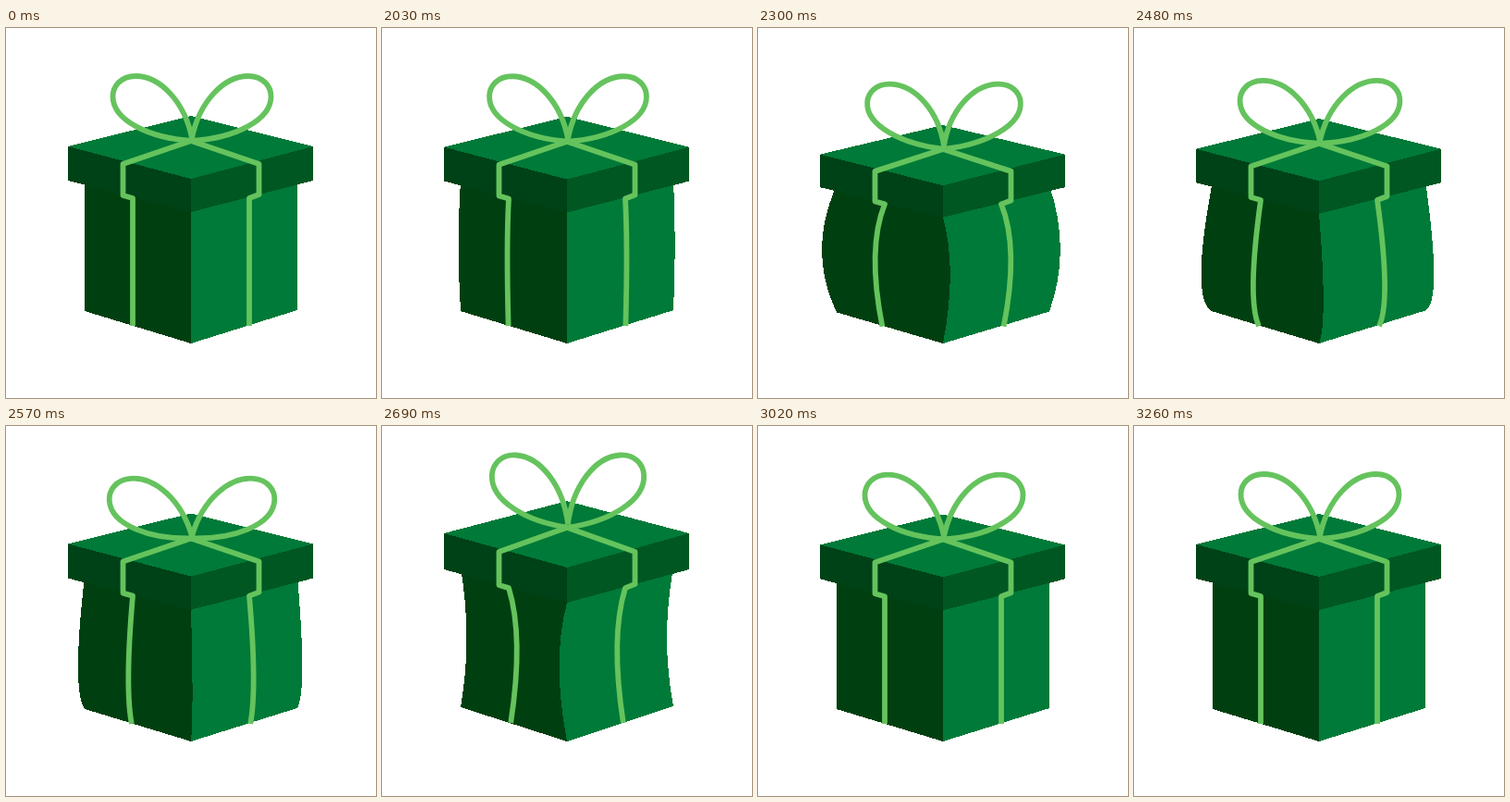
Animation, 400 px wide and 400 px high, one loop 3.35 s. Source, as an HTML page:

```html
<!DOCTYPE html>
<html lang="en">
<head>
<meta charset="utf-8">
<title>Gift box</title>
<style>
  html, body { margin: 0; width: 100%; height: 100%; overflow: hidden; background: #fff; }
  svg { display: block; width: 100%; height: 100%; }
  .ribbon { fill: none; stroke: #65c35d; stroke-width: 5.8; stroke-linejoin: round; }
</style>
</head>
<body>
<svg viewBox="0 0 400 400">
  <g shape-rendering="crispEdges">
    <path id="boxLeft" fill="#004010"/>
    <path id="boxRight" fill="#007a38"/>
    <path id="lidLeft" fill="#004217"/>
    <path id="lidRight" fill="#005722"/>
    <path id="lidTop" fill="#007a38"/>
  </g>
  <path id="ribbon" class="ribbon"/>
  <path id="bow" class="ribbon"/>
</svg>
<script>
const LOOP = 3350, START = 2030, STEP = 30, FLOOR = 341;

// Half a sine wave, zero outside its span
function hump(t, start, length, power = 1) {
  const x = (t - start) / length;
  return x > 0 && x < 1 ? Math.sin(Math.PI * x) ** power : 0;
}

// Crouch, spring up, settle; the box walls and the bow trail behind the lid
function poseAt(t) {
  const swell = hump(t, 2000, 667), pinch = hump(t, 2570, 320);
  return {
    squash: .041 * hump(t, 2000, 560, 1.4) - .059 * hump(t, 2560, 310, 1.4)
      + .004 * hump(t, 2870, 180) - .003 * hump(t, 3050, 180),
    left: 16 * swell - 7 * pinch,
    right: 12 * swell - 7.5 * pinch,
    front: 8 * swell ** 2 - 9 * pinch,
    band: 10.5 * swell - 9.5 * pinch,
    sag: 60 * hump(t, 2300, 390),
    lift: .06 * hump(t, 2000, 470) - .1 * hump(t, 2470, 150) + .085 * hump(t, 2610, 270)
  };
}

const set = (id, d) => document.getElementById(id).setAttribute('d', d);

function draw(t) {
  const { squash, left, right, front, band, sag, lift } = poseAt(t);
  const pt = (x, y) => `${x.toFixed(2)},${(y + (FLOOR - y) * squash).toFixed(2)} `;
  const poly = (...p) => 'M' + p.map(([x, y]) => pt(x, y)).join('L') + 'Z';

  const edge = `Q${pt(200 + 2 * front, 258 + sag)}${pt(200, 341)}`;
  const wall = (x, bulge, base) =>
    `M${pt(200, 190)}L${pt(200, 199)}${edge}L${pt(x, base)}` +
    `Q${pt(x + 2 * bulge, 236 + sag)}${pt(x, 163)}Z`;
  set('boxLeft', wall(85, -left, 306));
  set('boxRight', wall(315, right, 305));

  set('lidLeft', poly([67, 128], [200, 163], [200, 199], [67, 165]));
  set('lidRight', poly([332, 128], [200, 163], [200, 199], [332, 165]));
  set('lidTop', poly([200, 95], [332, 128], [200, 163], [67, 128]));

  const bend = 1.87 * band, foot = .25 * band, mid = 234 + sag;
  set('ribbon',
    `M${pt(137 - foot, 322)}Q${pt(137 - bend, mid)}${pt(137, 184)}` +
    `L${pt(126.5, 181)}L${pt(126.5, 147)}L${pt(200, 122)}` +
    `L${pt(273.5, 147)}L${pt(273.5, 180)}L${pt(263, 184)}` +
    `Q${pt(263 + bend, mid)}${pt(263 + foot, 322)}`);

  // Each loop turns about the knot
  const cos = Math.cos(lift), sin = Math.sin(lift);
  const loop = dir => {
    const b = (x, y) => pt(201 + dir * (x * cos - y * sin), 121 - x * sin - y * cos);
    return `M${b(0, 2)}C${b(8, 41)}${b(34, 69)}${b(61, 69)}` +
      `C${b(77, 69)}${b(85.5, 58)}${b(85.5, 47)}` +
      `C${b(85.5, 21)}${b(46, 2)}${b(0, -1)}`;
  };
  set('bow', loop(-1) + loop(1));
}

let origin;
function tick(now) {
  origin ??= now;
  const t = (now - origin) % LOOP;
  draw(t < START ? 0 : START + Math.floor((t - START) / STEP) * STEP);
  requestAnimationFrame(tick);
}
draw(0);
requestAnimationFrame(tick);
</script>
</body>
</html>
```
